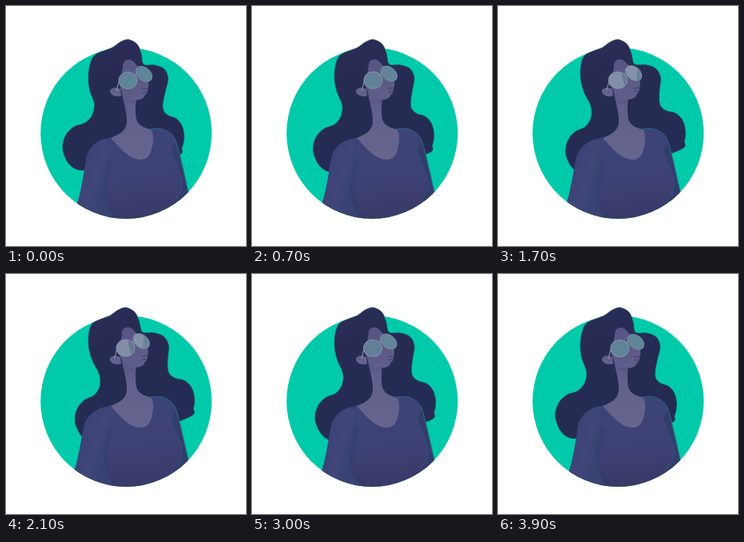
Recreate the animation shown at these times as an HTML page. Size 300 by 300 pixels, loop 4 s.

```html
<!DOCTYPE html>
<html lang="en">
<head>
<meta charset="utf-8">
<title>Portrait</title>
<style>
html, body { margin: 0; width: 100%; height: 100%; overflow: hidden; background: #fff; }
svg { display: block; width: 300px; height: 300px; }
</style>
</head>
<body>
<svg viewBox="0 0 300 300" fill="none" stroke-linecap="round">
  <defs>
    <linearGradient id="hairFill" gradientUnits="userSpaceOnUse" x1="110" y1="45" x2="175" y2="215">
      <stop offset="0" stop-color="#2a2c55"/>
      <stop offset=".45" stop-color="#252b53"/>
      <stop offset="1" stop-color="#242c55"/>
    </linearGradient>
    <linearGradient id="shirtFill" gradientUnits="userSpaceOnUse" x1="150" y1="165" x2="165" y2="265">
      <stop offset="0" stop-color="#3d4378"/>
      <stop offset=".5" stop-color="#3e4175"/>
      <stop offset="1" stop-color="#393a68"/>
    </linearGradient>
    <linearGradient id="sleeveFill" gradientUnits="userSpaceOnUse" x1="92" y1="200" x2="130" y2="212">
      <stop offset="0" stop-color="#3b4275"/>
      <stop offset=".6" stop-color="#404578"/>
      <stop offset="1" stop-color="#384372"/>
    </linearGradient>
    <linearGradient id="neckFill" gradientUnits="userSpaceOnUse" x1="155" y1="105" x2="157" y2="192">
      <stop offset="0" stop-color="#5c5a88"/>
      <stop offset=".35" stop-color="#62608c"/>
      <stop offset="1" stop-color="#65658f"/>
    </linearGradient>
    <linearGradient id="faceFill" gradientUnits="userSpaceOnUse" x1="148" y1="68" x2="166" y2="118">
      <stop offset="0" stop-color="#575483"/>
      <stop offset="1" stop-color="#605e8a"/>
    </linearGradient>
    <linearGradient id="lensFill" x1="0" y1="0" x2="1" y2="1">
      <stop offset="0" stop-color="#64809a"/>
      <stop offset="1" stop-color="#578a96"/>
    </linearGradient>
    <clipPath id="frame"><path d="M0 0H300V159H257.2A107 107 0 0 1 43.2 159H0Z"/></clipPath>
    <clipPath id="lensL"><ellipse cx="152.5" cy="93" rx="11.5" ry="10.5"/></clipPath>
    <clipPath id="lensR"><ellipse cx="172.5" cy="85" rx="11.5" ry="8" transform="rotate(40 172.5 85)"/></clipPath>
    <filter id="soft" x="-30%" y="-30%" width="160%" height="160%"><feGaussianBlur stdDeviation="1.6"/></filter>
  </defs>

  <circle cx="150.2" cy="159" r="107" fill="#00caaa"/>
  <g clip-path="url(#frame)">
    <path id="hair" fill="url(#hairFill)" stroke="#1d4964" stroke-width=".8"/>

    <path fill="url(#neckFill)" d="M144 104C147 120 151 133 151 143C151 157 141 161 128 166L150 196H178L188 156C176 153 164 151 162.500 139Q161 127 163 112Z"/>
    <path d="M145 112Q154 121 163 116L161 122Q152 121 147 117Z" fill="#524f7e" opacity=".55" filter="url(#soft)"/>

    <path id="shirt" fill="url(#shirtFill)"/>
    <path id="sleeve" fill="url(#sleeveFill)"/>
    <path d="M130 194C126 212 123 225 125 237Q128 252 138 263" stroke="#303b69" stroke-width="2.5" opacity=".65" filter="url(#soft)"/>
    <path d="M206 180C211 199 221 211 220 225Q218 238 208 245L225 242L228 233C222 211 218 188 212 170Z" fill="#333d6c"/>
    <path d="M206 180C211 199 221 211 220 225Q218 238 208 245" stroke="#31507c" stroke-width="1"/>
    <path d="M180 154C195 151 207 156 212 168C217 182 222 207 228 233" stroke="#246c86" stroke-width="1"/>

    <g id="head">
      <path fill="url(#faceFill)" d="M146 76C146 67 153 65 159 69C163 73 164 76 170 78C175 82 178 90 178 96C179 102 176 104 177 107C176 110 173 111 173 113C170 118 163 118 158 117C150 115 143 108 142 98Z"/>
      <path d="M146 75C143 83 144 96 141 104L137 102V75Z" fill="#272b54"/>
      <path d="M170 103Q173 105 176 102.500M171 108Q174 107 176 107.500" stroke="#454372" stroke-width="1.2"/>
      <path d="M143 104C138 101 131 102 130 106C130 111 137 115 144 112Z" fill="#64628e"/>
      <path d="M133 106Q137 105 140 109" stroke="#504e7c" stroke-width=".9"/>
      <g id="glasses">
        <path d="M141.500 94L138 106" stroke="#8890a7" stroke-width="1.1"/>
        <g clip-path="url(#lensR)">
          <path d="M158 70H188V100H158Z" fill="url(#lensFill)"/>
          <path class="haze" d="M158 70H188V100H158Z" fill="#74829d"/>
          <path class="glare" d="M156 70H176L172 100H156Z" fill="#a0a2b8"/>
        </g>
        <ellipse cx="172.5" cy="85" rx="11.5" ry="8" transform="rotate(40 172.5 85)" stroke="#748ca0" stroke-width=".9"/>
        <g clip-path="url(#lensL)">
          <path d="M138 80H168V108H138Z" fill="url(#lensFill)"/>
          <path class="haze" d="M138 80H168V108H138Z" fill="#6f7095"/>
          <path class="glare" d="M126 78H153L158 108H126Z" fill="#a0a2b8" stroke="#b4b8c8" stroke-width=".8"/>
        </g>
        <ellipse cx="152.5" cy="93" rx="11.5" ry="10.5" stroke="#8590a6" stroke-width="1"/>
        <path d="M161.500 87Q162 83 164 84" stroke="#8590a6" stroke-width="1"/>
      </g>
    </g>
  </g>
</svg>
<script>
const LOOP = 4000, STEP = 100;
const $ = id => document.getElementById(id);
const each = (name, fn) => document.querySelectorAll('.' + name).forEach(fn);
const clamp = v => Math.min(1, Math.max(0, v));

// Outline of the hair at rest, clockwise from the crown
const outline = [
  [153, 42], [164, 48], [169, 60], [172, 73], [186, 74], [198, 79], [202.5, 91],
  [199, 107], [196, 122], [197, 131], [203, 137], [213, 141], [220, 150], [222.5, 163],
  [220, 177], [212, 188], [140, 203], [104, 205], [88, 204], [77, 195],
  [71, 178], [74.5, 162], [85, 151], [99, 146], [108, 136], [110.5, 122],
  [105, 106], [103, 90], [105, 74], [110.5, 62], [122.5, 56], [133, 52], [143, 45]
];

// The tips swing about the crown while the crown leans back with the head
function sway([x, y], k) {
  const u = clamp((y - 55) / 100);
  const a = .13 * k * u * u * (3 - 2 * u);
  const lean = 3 * k * clamp((100 - y) / 45);
  const c = Math.cos(a), s = Math.sin(a), dx = x - 150, dy = y - 55;
  return [150 + dx * c + dy * s - lean, 55 + dy * c - dx * s];
}

// Closed smooth curve through the points
function smooth(pts) {
  const n = pts.length, at = i => pts[(i + n) % n];
  let d = 'M' + pts[0];
  for (let i = 0; i < n; i++) {
    const [a, b, c, e] = [at(i - 1), at(i), at(i + 1), at(i + 2)];
    const p = b.map((v, j) => v + (c[j] - a[j]) / 6);
    const q = c.map((v, j) => v - (e[j] - b[j]) / 6);
    d += `C${p} ${q} ${c}`;
  }
  return d + 'Z';
}

function draw(k) {
  $('hair').setAttribute('d', smooth(outline.map(p => sway(p, k))));

  const s = -4 * k;
  const arm = `M131 165C117 166 ${106 + s * .5} 173 ${101 + s * .7} 187C${98 + s} 204 ${95 + s} 229 ${89 + s} 247`;
  $('shirt').setAttribute('d', arm +
    'L100 275H225L229 235C222 209 217 182 212 168C207 156 195 151 180 154' +
    'C184 156 185 164 183 175C181 186 177 192 168 192C153 191 143 178 131 165Z');
  $('sleeve').setAttribute('d', arm + 'L105 270H137Q128 253 125 239C122 224 128 208 130 193Q130 176 124 166Z');

  $('head').setAttribute('transform', `rotate(${-2 * k} 138 112)`);
  $('glasses').setAttribute('transform', `translate(${-2.5 * k} 0)`);
  each('haze', h => h.setAttribute('opacity', .6 * k));
  each('glare', g => {
    g.setAttribute('opacity', .5 * clamp((k - .6) * 5));
    g.setAttribute('transform', `translate(${20 * (1 - k)} 0)`);
  });
}

function tick() {
  const t = Math.floor(performance.now() % LOOP / STEP) * STEP;
  draw(1 - Math.abs(1 - t / (LOOP / 2)));
  requestAnimationFrame(tick);
}
tick();
</script>
</body>
</html>
```
